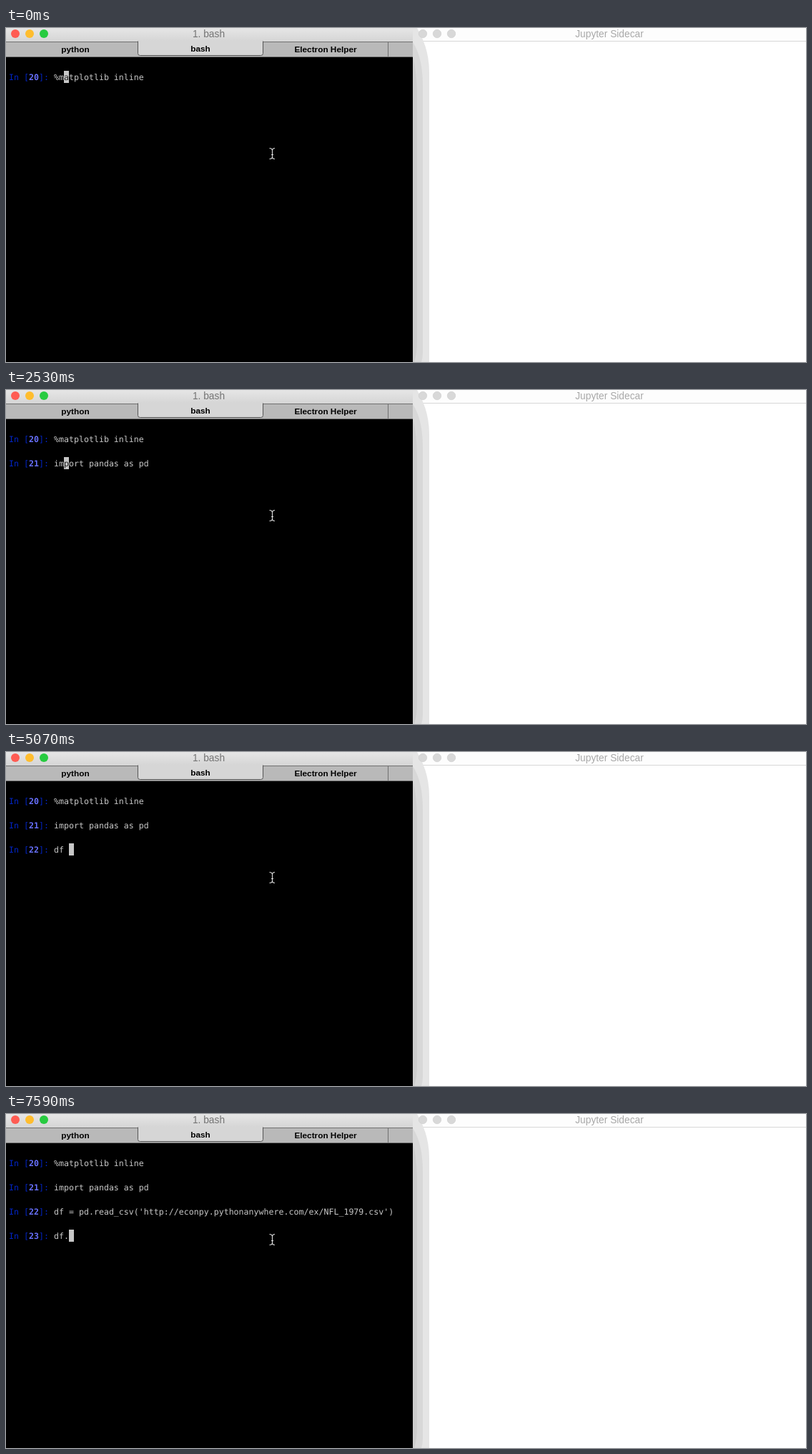
Recreate the animation shown at these times as an HTML page. Size 1119 px wide and 468 px high, loop 8 s.

```html
<!DOCTYPE html>
<html lang="en">
<head>
<meta charset="utf-8">
<title>Terminal session</title>
<style>
html, body { margin: 0; width: 100%; height: 100%; overflow: hidden; background: #fff; }
svg { display: block; width: 1119px; height: 468px; }
text { white-space: pre; }
.ui { font-family: "Liberation Sans", Arial, sans-serif; text-anchor: middle; }
.title { font-size: 13.75px; }
.tab { font-size: 11.8px; font-weight: bold; }
.term { font-family: "DejaVu Sans Mono", monospace; font-size: 11.627px; fill: #c7c7c7; text-rendering: geometricPrecision; }
.prompt { fill: #0225c7; }
.count { fill: #6871ff; font-weight: bold; }
</style>
</head>
<body>
<svg viewBox="0 0 1119 468">
  <defs>
    <linearGradient id="bar" x2="0" y2="1">
      <stop offset="0" stop-color="#e6e6e6"/>
      <stop offset="1" stop-color="#d5d5d5"/>
    </linearGradient>
  </defs>

  <!-- Preview window and the shadow over it -->
  <rect x="570" width="549" height="468" fill="#fff"/>
  <rect x="570" width="549" height="18" fill="#fdfdfd"/>
  <rect x="570" y="18" width="549" height="1" fill="#d8d8d8"/>
  <path d="M569 0H575C583 14 592 34 592 62V468H569Z" fill="#e5e5e5"/>
  <path d="M569 20C578 34 583 54 583 80V455Q583 462 581 468H569Z" fill="#d8d8d8"/>
  <path d="M569 40C573 55 575 75 575 95V440Q575 455 571 468H569Z" fill="#cdcdcd"/>
  <g fill="#d8d8d8" stroke="#cecece" stroke-width=".7">
    <circle cx="583" cy="8" r="5.7"/>
    <circle cx="603" cy="8" r="5.7"/>
    <circle cx="623" cy="8" r="5.7"/>
  </g>
  <text class="ui title" x="844" y="13" fill="#a8a8a8">Jupyter Sidecar</text>

  <!-- Terminal window -->
  <rect width="569" height="468" fill="#000"/>
  <rect width="569" height="19" fill="url(#bar)"/>
  <rect y="19" width="569" height="21" fill="#b9b9b9"/>
  <path d="M0 19.5H569M0 40.5H569M534.5 19V40" fill="none" stroke="#707070"/>
  <path d="M184.5 18.5V35.5Q184.5 38.5 187.5 38.5H356.5Q359.5 38.5 359.5 35.5V18.5" fill="#d6d6d6" stroke="#555"/>
  <rect x="185" y="18" width="174" height="2" fill="#d6d6d6"/>
  <circle cx="13" cy="8" r="6" fill="#ff5c53"/>
  <circle cx="33" cy="8" r="6" fill="#ffbd2e"/>
  <circle cx="53" cy="8" r="6" fill="#27cb40"/>
  <text class="ui title" x="283.5" y="13" fill="#747474">1. bash</text>
  <g class="ui tab">
    <text x="97" y="34">python</text>
    <text x="272" y="33">bash</text>
    <text x="447" y="34">Electron Helper</text>
  </g>

  <g id="lines" class="term"></g>
  <rect id="cursor" width="7" height="17" fill="#c7c7c7"/>
  <text id="under" class="term" style="fill:#222"></text>
  <path d="M368.5 168.5Q372.5 168.5 372.5 172V180.500Q372.5 183.500 368.5 183.500M376 168.5Q372.5 168.5 372.5 172M372.5 180.500Q372.5 183.500 376 183.500M371 177.500H374" fill="none" stroke="#ddd" stroke-width="1.1"/>
</svg>
<script>
const LOOP = 8000, CELL = 7, ROW = 17, LEFT = 4, TOP = 60, BASE = 13, PROMPT = 9;
const magic = "%matplotlib inline";
const load = "import pandas as pd";
const read = "df = pd.read_csv('http://econpy.pythonanywhere.com/ex/NFL_1979.csv')";

// Each step: start time, input number, its text, cursor column (-1: waiting on the next row)
const steps = [
  [0, 0, magic, 2], [290, 0, magic, -1],
  [590, 1, "", 0], [2240, 1, "i", 1], [2390, 1, "im", 2],
  [2530, 1, load, 2], [3130, 1, load, -1],
  [3280, 2, "", 0], [4330, 2, "s", 1], [4780, 2, "d", 1],
  [4920, 2, "df", 2], [5070, 2, "df ", 3],
  [5360, 2, read, 3], [5960, 2, read, -1],
  [6550, 3, "", 0], [7300, 3, "d", 1], [7450, 3, "df", 2], [7590, 3, "df.", 3]
];
const done = [magic, load, read];
const byId = id => document.getElementById(id);
const cursor = byId("cursor"), under = byId("under");

function add(parent, tag, attrs, content = "") {
  const el = document.createElementNS("http://www.w3.org/2000/svg", tag);
  for (const key in attrs) el.setAttribute(key, attrs[key]);
  el.textContent = content;
  return parent.appendChild(el);
}

function place(el, x, y) {
  el.setAttribute("x", x);
  el.setAttribute("y", y);
}

const inputs = [0, 1, 2, 3].map(i => {
  const group = add(byId("lines"), "g", {});
  const y = TOP + 2 * ROW * i + BASE;
  const put = (col, cls, str) => add(group, "text", { x: LEFT + col * CELL, y, class: cls }, str);
  put(0, "prompt", "In [");
  put(4, "count", String(20 + i));
  put(6, "prompt", "]:");
  return { group, code: put(PROMPT, "code", "") };
});

let shown;
function render(time) {
  const step = steps.findLast(s => s[0] <= time);
  if (step === shown) return;
  shown = step;
  const [, current, typed, col] = step;
  inputs.forEach(({ group, code }, i) => {
    group.style.display = i <= current ? "" : "none";
    code.textContent = i < current ? done[i] : typed;
  });
  const waiting = col < 0;
  const x = LEFT + (waiting ? 0 : PROMPT + col) * CELL;
  const y = TOP + (2 * current + (waiting ? 1 : 0)) * ROW;
  place(cursor, x, y);
  place(under, x, y + BASE);
  under.textContent = waiting ? "" : typed[col] || "";
}

const start = performance.now();
function tick() {
  render((performance.now() - start) % LOOP);
  requestAnimationFrame(tick);
}
tick();
</script>
</body>
</html>
```
